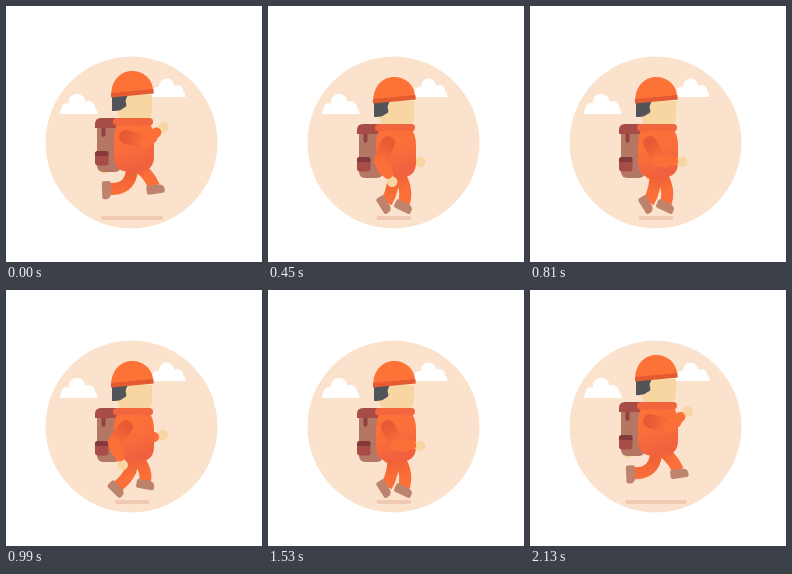
These frames come from a looping animation (256x256 px, 2160 ms). An HTML page:

```html
<!DOCTYPE html>
<html lang="en">
<head>
<meta charset="utf-8">
<title>Running hiker</title>
<style>
  html, body { margin: 0; width: 100%; height: 100%; overflow: hidden; background: #fff; }
  svg { display: block; width: 100vw; height: 100vh; }
  .limb { fill: none; stroke-linejoin: round; stroke-linecap: round; }
</style>
</head>
<body>
<svg viewBox="0 0 256 256">
  <defs>
    <linearGradient id="suit" x1="0" y1="0" x2=".3" y2="1">
      <stop offset="0" stop-color="#fd7236"/>
      <stop offset=".55" stop-color="#fb6e3a"/>
      <stop offset="1" stop-color="#f1603f"/>
    </linearGradient>
    <g id="cloud" fill="#fff">
      <circle cx="7" cy="-5.500" r="5.500"/>
      <circle cx="17" cy="-11.800" r="8.300"/>
      <circle cx="28.500" cy="-6.500" r="6.500"/>
      <path d="M0 0 Q0 -7 6 -8 H31 Q37.500 -7 37.500 0Z"/>
    </g>
  </defs>
  <circle cx="125.500" cy="136.500" r="86" fill="#fbe2cc"/>
  <use href="#cloud" transform="translate(54 108)"/>
  <use href="#cloud" transform="translate(145 91) scale(.92)"/>
  <rect id="shadow" y="210" height="4" rx="2" fill="#efc9b1"/>
  <g id="farArm"></g>
  <g class="bob">
    <rect x="91" y="120" width="24" height="52" rx="6" fill="#b47763"/>
    <path d="M89 128 V124 Q89 118 95 118 H112 V128Z" fill="#a74c47"/>
    <path d="M95.500 128 H99.500 V135 Q97.500 139 95.500 135Z" fill="#904141"/>
    <rect x="89" y="151" width="13.500" height="14.500" rx="3" fill="#a74c47"/>
    <path d="M89 156 V154 Q89 151 92 151 H99.500 Q102.500 151 102.500 154 V156Z" fill="#843a3b"/>
  </g>
  <g id="farLeg"></g>
  <g id="nearLeg"></g>
  <g class="bob">
    <path d="M109 95 H146 V110 Q146 117 141 120 H115 Q112 115 111 110Z" fill="#f8d6a2"/>
    <path d="M106 96 H121.500 Q118.800 100 120 103 Q121.500 107 117.500 108 Q114.500 111.500 106 111Z" fill="#525459"/>
    <path d="M105.200 94.500 C105.200 81 114 71 126 71 C138 71 146.500 79 147.300 91Z" fill="#fd7236"/>
    <path d="M105 93 L147.300 89 L147.800 93.500 L105 97.500Z" fill="#e45a31"/>
    <path d="M113 121 H142 Q148 128 148 139 V156 Q148 171 134 171.500 H121 Q108 171 108 156 V139 Q108 128 113 121Z" fill="url(#suit)"/>
    <rect x="107" y="118" width="40" height="7.300" rx="3.600" fill="#f2663d"/>
  </g>
  <g id="nearArm"></g>
</svg>
<script>
const CYCLE = 720, STEP = 30, SHADE = "#e75a34", LIGHT = "#fc6f38", SKIN = "#f8d6a2";

// Eight key poses per run cycle, 90 ms apart.
const arm = {
  upper: [76, 26, -8, -36, -65, -22, 8, 45],
  bend: [51, 60, 58, 55, 54, 50, 55, 58]
};
const leg = {
  kneeX: [142, 141, 137, 130, 128, 126, 134, 142],
  kneeY: [166, 179, 186, 182, 184, 184, 182, 178],
  footX: [148, 136, 124, 112, 104, 118.5, 128, 139],
  footY: [180, 197, 201, 196, 183, 196, 197, 191],
  tilt: [-8, 25, 20, 45, 88, 58, 40, 10]
};
const bodyY = [-6, 0, 1, 0, -6, 0, 1, 0];
const shadowW = [62, 35, 24, 35, 62, 35, 24, 35];

// Each stride pauses briefly at its widest and narrowest pose.
const pace = [0, 0, 40, 90, 130, 165, 180, 180, 220, 270, 325, 352];

const $ = id => document.getElementById(id);
const bobs = document.querySelectorAll(".bob");

function make(parent, tag, attrs) {
  const el = document.createElementNS("http://www.w3.org/2000/svg", tag);
  set(el, attrs);
  return parent.appendChild(el);
}

function set(el, attrs) {
  for (const name in attrs) el.setAttribute(name, attrs[name]);
}

function addGradient(parent, id) {
  const grad = make(parent, "linearGradient", { id, gradientUnits: "userSpaceOnUse" });
  make(grad, "stop", { offset: 0, "stop-color": SHADE });
  make(grad, "stop", { offset: 1, "stop-color": LIGHT });
  return grad;
}

// Smooth cyclic interpolation, at rest on every even key.
function at(keys, pos) {
  const n = keys.length, i = Math.floor(pos), u = pos - i;
  const get = k => keys[(k + n) % n];
  const slope = k => k % 2 ? (get(k + 1) - get(k - 1)) / 2 : 0;
  const a = get(i), b = get(i + 1), v = 1 - u;
  return a * (1 + 2 * u) * v * v + b * u * u * (3 - 2 * u)
    + slope(i) * u * v * v - slope(i + 1) * u * u * v;
}

function buildArm(id) {
  const g = $(id);
  return {
    grad: addGradient(g, id + "Fill"),
    wrist: make(g, "path", { class: "limb", stroke: SKIN, "stroke-width": 7 }),
    hand: make(g, "circle", { r: 5.3, fill: SKIN }),
    sleeve: make(g, "path", { class: "limb", stroke: `url(#${id}Fill)`, "stroke-width": 14 }),
    cuff: make(g, "path", { class: "limb", stroke: LIGHT, "stroke-width": 10 })
  };
}

function buildLeg(id) {
  const g = $(id);
  return {
    grad: addGradient(g, id + "Fill"),
    limb: make(g, "path", {
      class: "limb", stroke: `url(#${id}Fill)`, "stroke-width": 12,
      style: "stroke-linecap:butt"
    }),
    shoe: make(g, "path", {
      d: "M-6 -1 H5 Q10 0 10 4 V6 Q10 8 8 8 H-6 Q-8 8 -8 6 V1 Q-8 -1 -6 -1Z",
      fill: "#bd836d"
    })
  };
}

function reach([x, y], length, degrees) {
  const r = degrees * Math.PI / 180;
  return [x + length * Math.sin(r), y + length * Math.cos(r)];
}

function poseArm(part, pos, dy) {
  const shoulder = [120, 137 + dy], upper = at(arm.upper, pos);
  const fore = upper + at(arm.bend, pos);
  const elbow = reach(shoulder, 19, upper);
  const mid = reach(elbow, 8, fore), cuff = reach(elbow, 15, fore), hand = reach(elbow, 24, fore);
  set(part.grad, { x1: shoulder[0], y1: shoulder[1], x2: elbow[0], y2: elbow[1] });
  set(part.sleeve, { d: `M${shoulder} L${elbow} L${mid}` });
  set(part.cuff, { d: `M${elbow} L${cuff}` });
  set(part.wrist, { d: `M${cuff} L${hand}` });
  set(part.hand, { cx: hand[0], cy: hand[1] });
}

function poseLeg(part, pos, dy) {
  const hip = [126, 162 + dy];
  const [kx, ky, fx, fy, tilt] = Object.values(leg).map(keys => at(keys, pos));
  set(part.grad, { x1: hip[0], y1: hip[1], x2: kx, y2: ky + 4 });
  set(part.limb, { d: `M${hip} Q${kx} ${ky} ${fx} ${fy}` });
  set(part.shoe, { transform: `translate(${fx} ${fy}) rotate(${tilt})` });
}

const nearArm = buildArm("nearArm"), farArm = buildArm("farArm");
const nearLeg = buildLeg("nearLeg"), farLeg = buildLeg("farLeg");

function draw(time) {
  const slot = Math.floor(time % CYCLE / STEP);
  const half = Math.floor(slot / pace.length);
  const pos = half * 4 + pace[slot % pace.length] / 90;
  const other = (pos + 4) % 8;
  const dy = at(bodyY, pos), width = at(shadowW, pos);
  bobs.forEach(el => set(el, { transform: `translate(0 ${dy})` }));
  set($("shadow"), { x: 126 - width / 2, width });
  poseArm(nearArm, pos, dy);
  poseArm(farArm, other, dy);
  poseLeg(nearLeg, other, dy);
  poseLeg(farLeg, pos, dy);
}

const start = performance.now();
function tick() {
  draw(performance.now() - start);
  requestAnimationFrame(tick);
}
tick();
</script>
</body>
</html>
```
